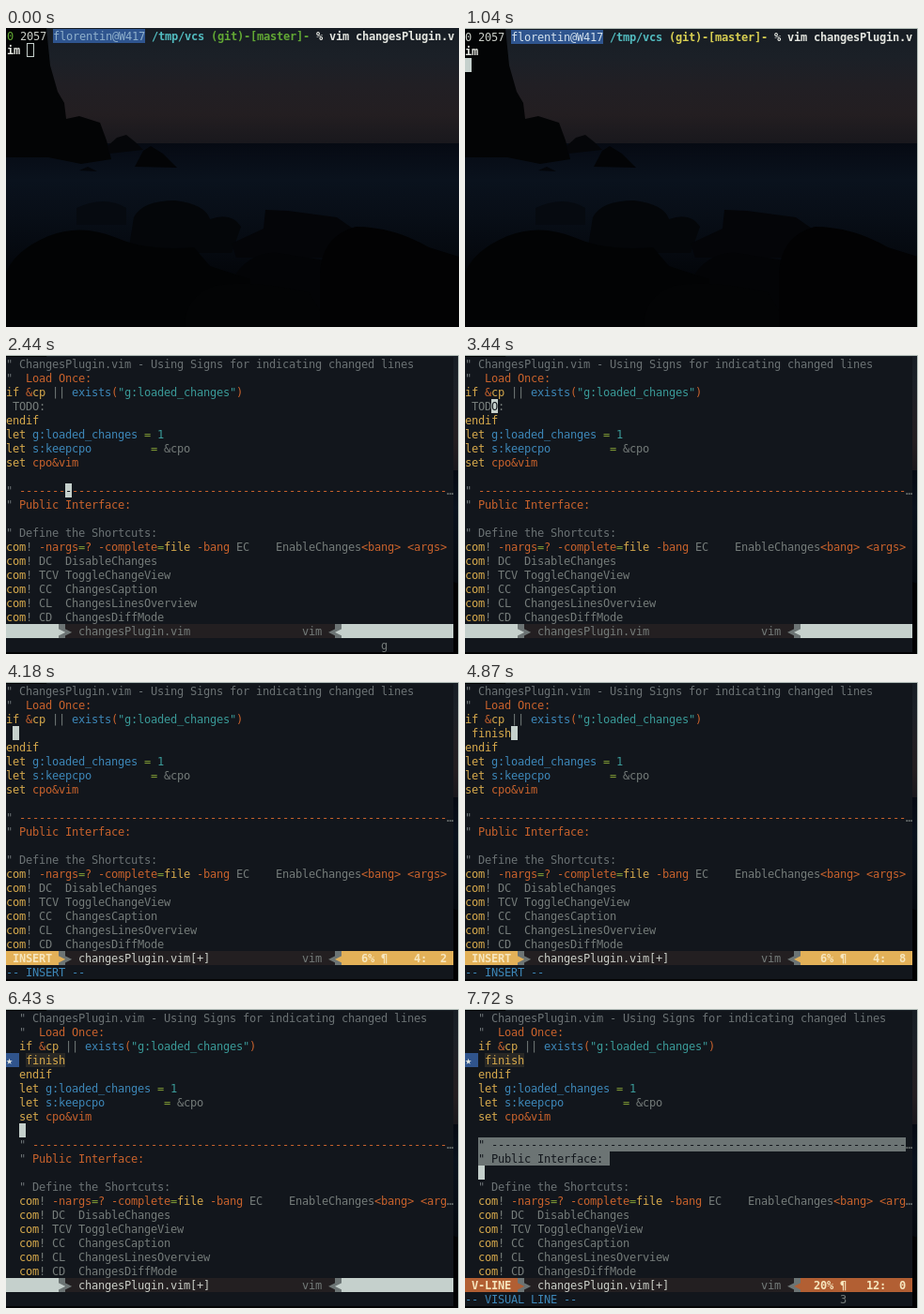
Recreate the animation shown at these times as an HTML page with a canvas. Size 482x319 px, loop 8 s.

```html
<!DOCTYPE html>
<html lang="en">
<head>
<meta charset="utf-8">
<title>Terminal session</title>
<style>
html, body { margin: 0; width: 482px; height: 319px; overflow: hidden; background: #000; }
canvas { display: block; }
</style>
</head>
<body>
<canvas id="stage" width="482" height="319"></canvas>
<script>
const ctx = document.getElementById('stage').getContext('2d');
const CW = 7, CH = 15, COLS = 68, LOOP = 8000;
const FONT = '12px "DejaVu Sans Mono", monospace';
const BG = '#12161c', CURSOR = '#c5d0cc', GREY = '#6c7474', BAR = '#231f21';

// Markup: "~" plus a colour letter starts a run; capitals are bold.
const INK = {
  c: '#6b7274', n: '#747b79', y: '#d6a94c', o: '#c8622c', b: '#3d87b8',
  t: '#3a9a98', g: '#7f9a35', w: '#e4e6e0', l: '#c9cdc6', m: '#8d8a7e',
  u: '#d4e2ee', v: '#8fb0cc', k: BG, i: '#f6e6be', p: '#52bcc0', s: '#d8cf52', e: '#62a834'
};

const lines = [
  '~c" ChangesPlugin.vim - Using Signs for indicating changed lines',
  '~c"  ~oLoad Once:',
  '~yif ~o&~ycp ~n|| ~bexists~o(~t"g:loaded_changes"~o)',
  '',
  '~yendif',
  '~ylet ~bg:loaded_changes ~g= ~t1',
  '~ylet ~bs:keepcpo         ~g= ~n&cpo',
  '~yset ~ocpo&vim',
  '',
  '~c" ~o' + '-'.repeat(76),
  '~c" ~oPublic Interface:',
  '',
  '~c" Define the Shortcuts:',
  '~ycom~n! ~o-nargs~g=~o? -complete~g=~yfile ~o-bang ~nEC    EnableChanges~o<bang> <args>',
  ...['DC  DisableChanges', 'TCV ToggleChangeView', 'CC  ChangesCaption',
    'CL  ChangesLinesOverview', 'CD  ChangesDiffMode'].map(s => '~ycom~n! ' + s)
];

// Cursor path: time, row, column (-1 hides it)
const moves = [
  [1490, 9, 9], [2590, 0, 9], [2950, 1, 9], [3055, 2, 9], [3160, 3, 5],
  [3440, 3, 4], [3700, 3, 3], [3755, 3, 2], [3810, 3, 1],
  [5360, 3, 6], [5690, 4, 4], [5840, 5, 6], [6190, 6, 6], [6310, 7, 6],
  [6430, 8, 0], [6790, 9, 6], [7050, 9, -1], [7570, 10, 6], [7720, 11, 0]
];

let left = 0, top0 = 2;
const rowY = row => top0 + row * CH;

function rect(x, y, w, h, color) {
  ctx.fillStyle = color;
  ctx.fillRect(x, y, w, h);
}

function cells(col, row, count, color) {
  rect(left + col * CW, rowY(row), count * CW, CH, color);
}

function put(col, row, markup, only) {
  const width = COLS - col;
  const total = plain(markup).length;
  let n = 0;
  for (const run of markup.split('~').slice(1)) {
    const key = run[0], low = key.toLowerCase();
    ctx.font = (key === low ? '' : 'bold ') + FONT;
    for (const ch of run.slice(1)) {
      if (n >= width) return;
      const cut = total > width && n === width - 1;
      ctx.fillStyle = only && !cut ? only : cut ? INK.n : INK[low];
      ctx.fillText(cut ? '…' : ch, left + (col + n++) * CW, rowY(row) + 12);
    }
  }
}

function plain(markup) {
  return markup.replace(/~./g, '');
}

function glyph(col, row, ch, fg, bg) {
  cells(col, row, 1, bg);
  put(col, row, '~n' + ch, fg);
}

function shape(path, color) {
  ctx.fillStyle = color;
  ctx.fill(new Path2D(path));
}

function gradient(y0, y1, stops) {
  const g = ctx.createLinearGradient(0, y0, 0, y1);
  stops.forEach((c, i) => g.addColorStop(i / (stops.length - 1), c));
  return g;
}

function wallpaper() {
  rect(0, 0, 482, 123, gradient(0, 123, ['#171d24', '#1b2027', '#211f24', '#231e21', '#19181d']));
  rect(0, 123, 482, 196, gradient(123, 319, ['#060a13', '#0a121d', '#080e17', '#05090f', '#020306', '#010203']));
  shape('M0 0H43L47 40L55 68L62 80L64 97L78 94L100 101L107 120L112 140L80 145L45 138L0 138Z', '#030405');
  shape('M108 126L118 117L128 114L138 122L146 130L110 134Z', '#050609');
  shape('M137 148L146 131L154 126L167 134L182 149Z', '#030406');
  shape('M78 152L87 148L97 153Z', '#04060a');
  shape('M75 192Q105 178 128 192V210H75Z', '#060a10');
  shape('M136 202Q145 184 180 184Q212 188 217 204Q240 196 250 212L240 240H130Z', '#040609');
  shape('M274 214L276 194L300 195L352 202L372 216L340 245H245L240 230Z', '#040508');
  shape('M245 262Q262 238 290 240L340 248V300H245Z', '#030406');
  shape('M0 319V262Q8 238 45 222Q80 208 118 224Q150 238 200 234L217 254L260 268V319Z', '#020304');
  shape('M190 319Q190 286 222 275Q262 268 322 282L345 319Z', '#030405');
  shape('M334 319V262Q336 222 372 212Q412 212 450 234L482 244V319Z', '#020203');
}

function shell(t) {
  const focused = t >= 710;
  left = focused ? 0 : 1;
  top0 = focused ? 2 : 1;
  if (focused) frame();
  cells(7, 0, 14, '#2f558f');
  put(0, 0, (focused ? '~l0' : '~e0') + ' ~l2057 ' + (focused ? '~u' : '~v') + 'florentin@W417 ~P/tmp/vcs ' +
    (focused ? '~S' : '~E') + '(git)-[master]- ~W% vim changesPlugin.v');
  put(0, 1, '~Wim');
  if (!focused) {
    ctx.strokeStyle = CURSOR;
    ctx.strokeRect(left + 21.5 - 0.5 + 0.5, rowY(1) + 0.5, 7, 14);
  } else if (t < 1040) cells(3, 1, 1, CURSOR);
  else cells(0, 2, 1, CURSOR);
}

function frame() {
  rect(0, 0, 482, 1, '#b4beb9');
  rect(481, 0, 1, 319, '#b4beb9');
}

function statusLine(mode, row, column, modified) {
  const color = { INSERT: '#e3b158', 'V-LINE': '#b25f33' }[mode] || CURSOR;
  cells(0, 19, COLS, BAR);
  cells(0, 19, 8, color);
  cells(51, 19, 17, color);
  glyph(8, 19, '▶', color, GREY);
  glyph(9, 19, '▶', GREY, BAR);
  put(11, 19, modified ? '~lchangesPlugin.vim[+]' : '~nchangesPlugin.vim');
  put(45, 19, '~nvim');
  glyph(49, 19, '◀', GREY, BAR);
  glyph(50, 19, '◀', color, GREY);
  if (!mode) return;
  const percent = Math.floor((row + 1) / 60 * 100);
  put(1, 19, '~I' + mode);
  put(53, 19, `~I${String(percent).padStart(2 + (percent < 10))}% ¶ ${String(row + 1).padStart(4)}:${String(column).padStart(3)}`
    .replace(/^~I\s*/, m => '~I' + ' '.repeat(percent < 10 ? 1 : 0)));
}

function editor(t) {
  left = 0;
  top0 = 2;
  frame();
  rect(0, 2, 476, 315, BG);
  if (t < 1490) return put(0, 20, '~m"changesPlugin.vim" 60L, 1689C');

  const inserting = t >= 4180 && t < 5360;
  const visual = t >= 7050;
  const typed = t < 4380 ? 0 : Math.min(6, 1 + Math.floor((t - 4380) / 98));
  const gutter = t >= 5570 ? 2 : 0;
  let [, row, col] = moves.filter(m => m[0] <= t).pop();
  if (inserting) col = 1 + typed;

  const edited = t < 4180 ? '~n TODO:' : '~y ' + 'finish'.slice(0, typed);
  const text = lines.map((s, i) => i === 3 ? edited : s);

  if (gutter) {
    cells(0, 3, 2, '#30548c');
    put(0, 3, '~w★');
    cells(3, 3, 6, '#292825');
  }
  text.forEach((s, i) => {
    const selected = visual && i >= 9 && i <= row;
    if (selected) cells(gutter, i, Math.min(plain(s).length + 1, COLS - 1 - gutter), GREY);
    put(gutter, i, s, selected && BG);
  });
  if (col >= 0) glyph(gutter + col, row, plain(text[row])[col] || ' ', BG, CURSOR);

  const mode = visual ? 'V-LINE' : t >= 4180 && t < 5570 ? 'INSERT' : '';
  const column = row === 11 ? 0 : inserting ? col + 1 : 7;
  statusLine(mode, row, column, t >= 4180);

  if (inserting) put(0, 20, '~b-- INSERT --');
  if (visual) put(0, 20, '~b-- VISUAL LINE --');
  const pending = visual ? row - 8
    : t >= 2440 && t < 2590 ? 'g'
    : t >= 5270 && t < 5360 ? '^[' : '';
  put(57, 20, '~n' + pending);
}

function draw() {
  const t = performance.now() % LOOP;
  wallpaper();
  (t < 1260 ? shell : editor)(t);
  requestAnimationFrame(draw);
}
draw();
</script>
</body>
</html>
```
